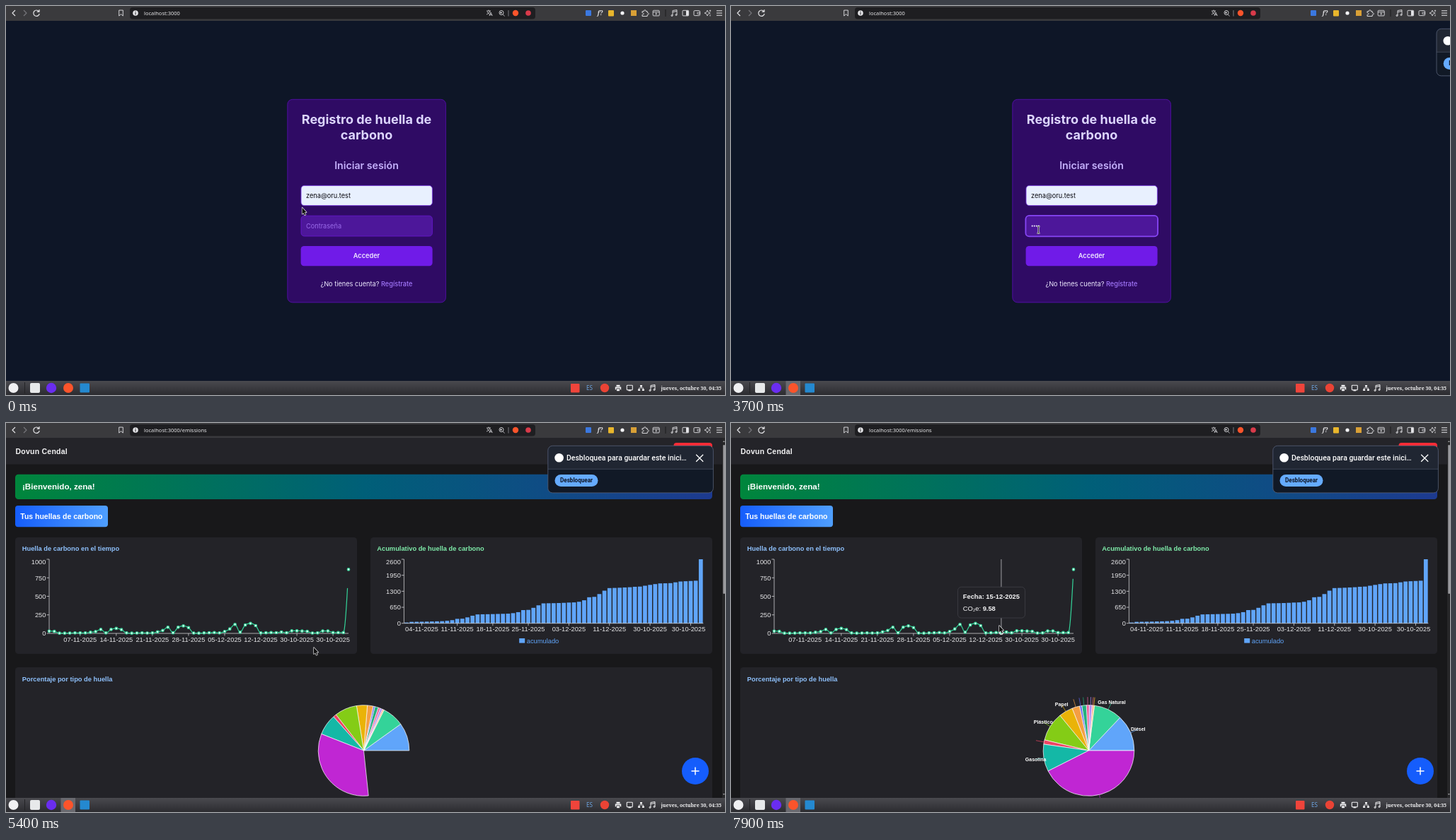
An HTML page with a canvas that plays this animation: 1016 by 551 pixels, repeating every 8 s.

```html
<!DOCTYPE html>
<html lang="es">
<head>
<meta charset="utf-8">
<title>Huella de carbono</title>
<style>
html, body { margin: 0; width: 100%; height: 100%; overflow: hidden; background: #0e1627; }
canvas { display: block; width: 1016px; height: 551px; }
</style>
</head>
<body>
<canvas id="stage"></canvas>
<script>
const W = 1016, H = 551, LOOP = 8000, STEP = 100;
const canvas = document.getElementById('stage');
const dpr = window.devicePixelRatio || 1;
canvas.width = W * dpr;
canvas.height = H * dpr;
const c = canvas.getContext('2d');

const INTER = 'Inter, sans-serif';
const ARIAL = '"Liberation Sans", Arial, sans-serif';
const ROBOTO = 'Roboto, sans-serif';
const NOTO = '"Noto Sans", sans-serif';
const SERIF = '"Noto Serif", serif';

// ---- helpers ----
const clamp = (v, a = 0, b = 1) => Math.min(b, Math.max(a, v));
const lerp = (a, b, k) => a + (b - a) * k;

// CSS "ease": cubic-bezier(.25, .1, .25, 1)
function ease(x) {
  x = clamp(x);
  let lo = 0, hi = 1;
  for (let i = 0; i < 24; i++) {
    const s = (lo + hi) / 2, r = 1 - s;
    if (0.75 * r * r * s + 0.75 * r * s * s + s * s * s < x) lo = s; else hi = s;
  }
  const r = 1 - lo;
  return 0.3 * r * r * lo + 3 * r * lo * lo + lo ** 3;
}

function rect(x, y, w, h, fill) {
  c.fillStyle = fill;
  c.fillRect(x, y, w, h);
}

function box(x, y, w, h, r, fill, stroke, lw = 0.8) {
  c.beginPath();
  c.roundRect(x, y, w, h, r);
  if (fill) { c.fillStyle = fill; c.fill(); }
  if (stroke) { c.strokeStyle = stroke; c.lineWidth = lw; c.stroke(); }
}

function disc(x, y, r, fill, stroke, lw = 1) {
  c.beginPath();
  c.arc(x, y, r, 0, 7);
  if (fill) { c.fillStyle = fill; c.fill(); }
  if (stroke) { c.strokeStyle = stroke; c.lineWidth = lw; c.stroke(); }
}

function line(x1, y1, x2, y2, color, lw = 0.7) {
  c.beginPath();
  c.moveTo(x1, y1);
  c.lineTo(x2, y2);
  c.strokeStyle = color;
  c.lineWidth = lw;
  c.stroke();
}

function icon(d, x, y, color = '#e4e4e7', lw = 1.1, fill = false) {
  const p = new Path2D(d);
  c.save();
  c.translate(x, y);
  if (fill) { c.fillStyle = color; c.fill(p); }
  else { c.strokeStyle = color; c.lineWidth = lw; c.stroke(p); }
  c.restore();
}

// y is the middle of the capitals; returns the advance width
function text(s, x, y, size, font, color, weight = 400, align = 'left') {
  c.font = `${weight} ${size}px ${font}`;
  c.textAlign = align;
  c.fillStyle = color;
  c.fillText(s, x, y + size * 0.36);
  return c.measureText(s).width;
}

function hGrad(x1, x2, ...colors) {
  const g = c.createLinearGradient(x1, 0, x2, 0);
  colors.forEach((col, i) => g.addColorStop(i / (colors.length - 1), col));
  return g;
}

// ---- chart data ----
const DAILY = [31, 27, 3, 3, 4, 6, 6, 6, 15, 25, 53, 6, 53, 67, 51, 6, 3, 5, 6, 5, 6, 21, 40, 83, 8,
  83, 101, 78, 5, 3, 6, 8, 11, 6, 26, 60, 121, 16, 113, 135, 105, 6, 8, 11, 9.58, 18, 8, 34, 34, 32,
  27, 5, 6, 33, 33, 11, 10, 11, 863];
const N = DAILY.length;
const L = { x: 61, y: 298, w: 423, h: 105, top: 193 };
const B = { x: 562.4, y: 283.7, w: 423, h: 90.7, top: 193 };
const DX = L.w / (N - 1), BAND = B.w / N;
const dots = DAILY.map((v, i) => [L.x + DX * i, L.y - v / 1000 * L.h]);
let sum = 0;
const totals = DAILY.map(v => sum += v);

function dateOf(i) {
  if (i > 46) return '30-10-2025';
  const day = i % 30 + 1, month = i < 30 ? 11 : 12;
  return `${String(day).padStart(2, '0')}-${month}-2025`;
}

// Monotone cubic through the dots, sampled to a polyline
const curve = (() => {
  const slope = i => (dots[i + 1][1] - dots[i][1]) / DX;
  const m = dots.map((_, i) => {
    if (!i || i === N - 1) return 0;
    const a = slope(i - 1), b = slope(i);
    return (Math.sign(a) + Math.sign(b)) * Math.min(Math.abs(a), Math.abs(b), Math.abs(a + b) / 4);
  });
  m[0] = (3 * slope(0) - m[1]) / 2;
  m[N - 1] = (3 * slope(N - 2) - m[N - 2]) / 2;
  const pts = [];
  let len = 0;
  for (let i = 0; i < N - 1; i++) {
    for (let j = i ? 1 : 0; j <= 10; j++) {
      const u = j / 10, v = 1 - u;
      const x = dots[i][0] + DX * u;
      const y = dots[i][1] * v * v * (1 + 2 * u) + dots[i + 1][1] * u * u * (3 - 2 * u)
        + DX * u * v * (m[i] * v - m[i + 1] * u);
      const p = pts[pts.length - 1];
      if (p) len += Math.hypot(x - p[0], y - p[1]);
      pts.push([x, y, len]);
    }
  }
  return { pts, len };
})();

// end angle in degrees, colour, label
const SLICES = [
  [46.6, '#60a5fa', 'Diésel'], [82.8, '#34d399', 'Gas Natural'], [84.3, '#fbbf24'], [86, '#fb7185'],
  [89.4, '#a78bfa'], [93, '#ec5f9e'], [98.9, '#22b07d'], [101.7, '#6366f1'], [111.4, '#f59e42'],
  [129.3, '#eab308', 'Papel'], [166.4, '#84cc16', 'Plástico'], [171.9, '#ef4463'],
  [206.8, '#14b8a6', 'Gasolina'], [360, '#c026d3']
];

// ---- browser and desktop bars ----
const NOTE = 'M-2 3V-4L4 -5V2M-2 -2L4 -3M-4 3a1 1 0 1 0 2 0a1 1 0 1 0 -2 0M2 2a1 1 0 1 0 2 0a1 1 0 1 0 -2 0';

function browserBar(url) {
  const ink = '#e4e4e7';
  rect(0, 0, W, 21, '#3a3a3d');
  box(175, 2, 573, 16.5, 4, '#1e1e21');
  icon('M2 -4L-2 0L2 4', 11, 10);
  icon('M-2 -4L2 0L-2 4', 27, 10, '#77777c');
  icon('M3.5 -2.2A4.2 4.2 0 1 0 4.2 .8M4 -5V-1.8H.8', 43, 10, ink, 1.2);
  icon('M-2.8 -4H2.8V4L0 1.5L-2.8 4Z', 162.5, 10, ink, 0.9);
  disc(183, 10, 3.8, ink);
  rect(182.5, 9.3, 1, 3, '#1e1e21');
  rect(182.5, 7.6, 1, 1, '#1e1e21');
  text(url, 195, 10, 7.5, NOTO, '#e8e8ea');
  icon('M-4 -3H2M-1 -4.5V-3M1 -3C0 0 -2 1 -4 2M-3 -2C-2 0 -1 1 0 1.5M0 4L2 -1L4.2 4M.8 2.4H3.4', 683, 10, ink, 0.8);
  disc(700, 9.5, 3, null, ink, 0.9);
  icon('M2.2 2L4.6 4.4M-2 -.5H1M-.5 -2V1', 700, 10, ink, 0.8);
  line(710, 6, 710, 14.5, '#a1a1aa');
  disc(720, 10, 4.2, '#fb542b');
  disc(738, 10, 3.8, '#d93a4a');
  box(819, 6, 8, 8, 1, '#3b78e0');
  text('f?', 839.5, 10, 8, SERIF, ink, 'italic 700', 'center');
  box(851, 6, 8, 8.5, 1, '#e9b62c');
  disc(871, 10, 2.6, '#f4f4f5');
  box(883, 6, 8, 8, 0, '#d9a036');
  icon('M-4 -2.5H-1.5A1.4 1.4 0 1 1 1.2 -2.5H3.2V-.2A1.4 1.4 0 1 1 3.2 2.3V4.5H-4V2.3A1.4 1.4 0 1 0 -4 -.2Z', 903, 10, ink, 0.9);
  box(914.2, 6.3, 9, 7.6, 1, null, ink, 0.9);
  icon('M-4.5 -1.5H4.5M-1 1A1 1 0 1 0 1 1A1 1 0 1 0 -1 1', 918.7, 10, ink, 0.8);
  line(932, 5, 932, 15, '#1c1c1e', 1);
  icon(NOTE, 944, 10.5, ink, 0.9);
  box(956, 6.3, 8.6, 7.6, 1, null, ink, 0.9);
  rect(961, 6.5, 3.4, 7.2, ink);
  box(972, 6.6, 8.6, 7, 1.2, null, ink, 0.9);
  box(977, 9, 3.6, 2.4, 0.5, null, ink, 0.8);
  icon('M-1 -4L.3 -1.2L3.2 0L.3 1.2L-1 4L-2.2 1.2L-5 0L-2.2 -1.2ZM3 -4.5V-2M1.8 -3.2H4.2M3 2V4.5', 992, 10, ink, 0.8);
  icon('M-4 -3.2H4M-4 0H4M-4 3.2H4', 1008, 10);
}

function taskbar(active) {
  const ink = '#f0f0f2', y = 541;
  const g = c.createLinearGradient(0, 531, 0, H);
  g.addColorStop(0, '#4a4a4f');
  g.addColorStop(1, '#2c2c30');
  rect(0, 531, W, 20, g);
  if (active) rect(77.5, 531, 20.5, 20, '#69696f');
  disc(10.5, y, 7, '#f0f0f2');
  line(26.5, 533, 26.5, 549, '#232326', 1);
  box(34, 534, 14, 14, 2, '#e7e9ea');
  disc(64, y, 7.2, '#6a2df0');
  disc(88, y, 7, '#fb542b');
  box(104.5, 534.5, 13.5, 13, 1, '#2489d0');
  box(798, 535, 12.5, 12.5, 1, '#ef443b');
  text('ES', 824.5, y, 8.2, NOTO, '#6ba3df', 400, 'center');
  disc(846, y, 6.2, '#ea4335');
  icon('M-2.5 -4.2H2.5V-2H-2.5ZM-4.2 -1.4H4.2V2.4H2.7V.6H-2.7V2.4H-4.2ZM-2 1.4H2V4.2H-2Z', 865, y, ink, 1, true);
  box(877.3, 537.3, 8, 6.6, 0.8, null, ink, 1.1);
  rect(879.5, 544, 3.6, 1.4, ink);
  icon('M-1.5 -4H1.5V-1.5H-1.5ZM-4.4 1.5H-1.4V4H-4.4ZM1.4 1.5H4.4V4H1.4Z', 897.5, y, ink, 1, true);
  icon('M0 -1.5V0M-2.9 1.5V0H2.9V1.5', 897.5, y, ink, 0.8);
  icon(NOTE, 913, y + 0.5, ink, 1);
  text('jueves, octubre 30, 04:35', 1011, y, 7, SERIF, '#f4f4f5', 700, 'right');
}

// ---- sign-in page ----
function signIn(t) {
  rect(0, 21, W, 510, '#0e1627');
  box(397.8, 132.3, 223.6, 287.6, 7, '#2f0b64', '#5b10b4');
  text('Registro de huella de', 509.5, 161, 18, INTER, '#ddd6ff', 700, 'center');
  text('carbono', 509.5, 182.5, 18, INTER, '#ddd6ff', 700, 'center');
  text('Iniciar sesión', 509.5, 226, 14.2, INTER, '#c4b0fb', 600, 'center');

  const onMail = t === 600, onPass = t >= 700;
  box(417, 254.4, 185.4, 28.2, 4.5, '#e8f0fe', onMail ? '#8e51ff' : '#7a3be6', onMail ? 2 : 0.8);
  text('zena@oru.test', 424, 268.3, 9.2, INTER, '#0b0b10');
  if (onPass) box(416.4, 296.8, 186.7, 29.6, 5, '#4d179a', '#8746f5', 1.8);
  else box(417, 297.2, 185.4, 28.8, 4.5, '#4d179a', '#6a18d4');

  const typed = t < 1900 ? 0 : t < 2200 ? 1 : t < 2500 ? 2 : 4;
  if (!typed) text('Contraseña', 424, 311.3, 9.2, INTER, '#9a6bea');
  for (let i = 0; i < typed; i++) disc(425.7 + 3.05 * i, 311.6, 1.05, '#ede9fe');
  if (typed && t < 3100) rect(424.2 + 2.95 * typed, 305.5, 0.7, 11.5, '#ede9fe');

  box(416.6, 340, 186, 28.2, 4.5, '#701be8');
  text('Acceder', 509.5, 354, 9.2, INTER, '#f0ebff', 600, 'center');
  const w = text('¿No tienes cuenta? ', 444.5, 393.8, 9.2, INTER, '#ede9fe');
  text('Regístrate', 444.5 + w, 393.8, 9.2, INTER, '#a277fb', 500);

  const alpha = t < 1900 ? clamp((t - 800) / 500) : clamp((2000 - t) / 200);
  if (alpha > 0) unlockMenu(alpha);
}

function unlockMenu(alpha) {
  c.save();
  c.globalAlpha = alpha;
  box(581, 303.5, 13, 14, 1, '#2566e0');
  box(587.5, 314, 9, 6.6, 1.2, '#f4f4f5', '#2a2a2e', 0.6);
  icon('M-2 0V-1.5A2 2 0 0 1 2 -1.5V0', 592, 314, '#f4f4f5', 1);
  rect(590, 316.4, 4, 1.6, '#2a2a2e');

  box(416.8, 326.8, 186.6, 55.8, 2.5, '#2f343d', '#4b515c');
  line(417, 361, 603, 361, '#4b515c');
  text('Desbloquea tu cuenta para ver sugerencias de', 421.8, 337.4, 8.15, ROBOTO, '#fff');
  text('autocompletado', 421.8, 349.8, 8.15, ROBOTO, '#fff');
  box(425.5, 371, 7.6, 5.6, 1, null, '#6aa9fb', 1);
  icon('M-2 0V-1.6A2 2 0 0 1 1.8 -2.4', 429.2, 371, '#6aa9fb', 1);
  rect(428, 373.2, 2.6, 1, '#6aa9fb');
  text('Desbloquear la cuenta', 438.5, 372, 9.31, ROBOTO, '#6aa9fb', 700);
  c.restore();
}

// ---- dashboard ----
const INK = '#e6e6e8', CARD = '#232328';

function dashboard(t, mouse) {
  rect(0, 21, W, 510, '#18181a');
  rect(0, 21, 1012, 37.5, '#242429');
  c.letterSpacing = '0.26px';
  text('Dovun Cendal', 13.5, 40, 10.48, ARIAL, '#f4f4f5', 700);
  c.letterSpacing = '0px';
  box(943.5, 28, 54.5, 24, 4, '#fb2c36');

  box(13, 72.8, 985, 35.2, 4.5, hGrad(13, 998, '#00863c', '#005f78', '#1d3a90'));
  text('¡Bienvenido, zena!', 23, 89.8, 11.64, ARIAL, '#fff', 700);
  box(13, 117, 131, 30.3, 4, hGrad(13, 144, '#155dfc', '#4f9fff'));
  text('Tus huellas de carbono', 20.3, 132.2, 10.48, ARIAL, '#fff', 700);

  box(13, 162, 483, 165, 4.5, CARD);
  box(515, 162, 483, 165, 4.5, CARD);
  box(13, 346, 985, 220, 4.5, CARD);
  text('Huella de carbono en el tiempo', 22.8, 177.3, 9.31, ARIAL, '#8ec0fb', 700);
  text('Acumulativo de huella de carbono', 524.3, 177.3, 9.31, ARIAL, '#7fecaa', 700);
  text('Porcentaje por tipo de huella', 22.8, 362.3, 9.31, ARIAL, '#8ec0fb', 700);

  const ready = t >= 4200;
  if (ready) {
    barChart(ease((t - 4200) / 400));
    lineChart(ease((t - 4200) / 1500));
    pie(ease((t - 4738) / 1420), t >= 6200);
    if (t > 6600 && mouse.y < L.y) hover(t, mouse);
  }

  disc(974, 493, 19, '#155dfc');
  icon('M-5.5 0H5.5M0 -5.5V5.5', 974, 493, '#fff', 1.5);
  return ready;
}

function axes(a, marks, xs) {
  line(a.x, a.top, a.x, a.y, INK);
  line(a.x, a.y, a.x + a.w, a.y, INK);
  marks.forEach((m, i) => {
    const y = a.y - i / (marks.length - 1) * (a.y - a.top);
    line(a.x - 3.5, y, a.x, y, INK);
    text(m, a.x - 4.6, Math.max(y, 196.6), 9.31, ARIAL, INK, 400, 'right');
  });
  xs.forEach(([i, x]) => {
    line(x, a.y, x, a.y + 3.5, INK);
    text(dateOf(i), Math.min(x, 964.6), a.y + 8.4, 9.31, ARIAL, INK, 400, 'center');
  });
}

function barChart(k) {
  totals.forEach((v, i) => {
    const h = v / sum * B.h * k;
    rect(B.x + BAND * (i + 0.1), B.y - h, BAND * 0.8, h, '#60a5fa');
  });
  axes(B, [0, 650, 1300, 1950, 2600],
    [3, 10, 17, 24, 32, 40, 48, 56].map(i => [i, B.x + BAND * (i + 0.5)]));
  rect(725.2, 305, 8, 6.6, '#60a5fa');
  text('acumulado', 735.8, 308.2, 9.31, ARIAL, '#60a5fa');
}

function lineChart(k) {
  axes(L, [0, 250, 500, 750, 1000],
    [6, 13, 20, 27, 34, 41, 48, 55].map(i => [i, dots[i][0]]));
  c.beginPath();
  for (const [x, y, len] of curve.pts) {
    if (len > curve.len * k) break;
    c.lineTo(x, y);
  }
  c.strokeStyle = '#34d399';
  c.lineWidth = 1.2;
  c.stroke();
  for (const [x, y] of dots) disc(x, y, 1.75, '#fff', '#34d399', 1.2);
}

function pie(k, labels) {
  if (k <= 0) return;
  const x = 505.5, y = 464, r = 64.3, rad = Math.PI / 180;
  const at = (deg, d) => [x + d * Math.cos(deg * rad), y - d * Math.sin(deg * rad)];
  let from = 0;
  const mids = SLICES.map(([to, color]) => {
    c.beginPath();
    c.moveTo(x, y);
    c.arc(x, y, r, -from * k * rad, -to * k * rad, true);
    c.closePath();
    c.fillStyle = color;
    c.fill();
    c.strokeStyle = '#fff';
    c.lineWidth = 0.7;
    c.stroke();
    const mid = (from + to) / 2;
    from = to;
    return mid;
  });
  if (!labels) return;
  SLICES.forEach(([, color, name], i) => {
    const end = at(mids[i], r + 11.6);
    line(...at(mids[i], r), ...end, color);
    if (name) text(name, ...end, 7, ARIAL, '#fff', 700, 'center');
  });
}

function hover(t, mouse) {
  const i = clamp(Math.round((mouse.x - L.x) / DX), 0, N - 1);
  const [x, y] = dots[i];
  line(x, L.top, x, L.y, '#d4d4d8', 0.7);
  disc(x, y, 2.3, '#34d399', '#fff', 1.1);
  const k = ease((t - 6800) / 400);
  const bx = lerp(43, 320.5, k), by = lerp(198, 232.3, k);
  box(bx, by, 95, 43.8, 5, CARD, '#3f3f47');
  text(`Fecha: ${dateOf(i)}`, bx + 7.3, by + 13.6, 9.31, ARIAL, '#f4f4f5', 700);
  const w = text('CO₂e: ', bx + 7.3, by + 30.2, 9.31, ARIAL, '#f4f4f5');
  text(DAILY[i].toFixed(2), bx + 7.3 + w, by + 30.2, 9.31, ARIAL, '#f4f4f5', 700);
}

function scrollbar(tall) {
  rect(1012, 21, 4, 510, '#262628');
  box(1013.3, 31, 2.7, tall ? 211 : 300, 1.3, '#9a9a9e');
  icon('M-1.6 1L0 -1L1.6 1Z', 1014.4, 26, '#9a9a9e', 1, true);
  icon('M-1.6 -1L0 1L1.6 -1Z', 1014.4, 526, '#9a9a9e', 1, true);
}

function notice(t) {
  const s = t < 4000 ? Math.min(t, 3800) : t - 100;
  const x = Math.max(765.8, 997 - 0.89 * (s - 3700));
  if (x > W) return;
  box(x, 32.3, 233.6, 66.6, 6.5, '#111926');
  box(x, 32.3, 233.6, 33, [6.5, 6.5, 0, 0], '#202632');
  line(x, 65.3, x + 233.6, 65.3, '#4c5566');
  box(x, 32.3, 233.6, 66.6, 6.5, null, '#59637a');
  disc(x + 15.8, 49.3, 6.3, '#fff');
  text('Desbloquea para guardar este inici…', x + 26.2, 49, 10.48, ROBOTO, '#fff', 500);
  icon('M-5 -5L5 5M5 -5L-5 5', x + 214.4, 49.8, '#fff', 1.3);
  box(x + 9.7, 73, 61, 17, 8.5, '#65abff');
  text('Desbloquear', x + 40.2, 81.3, 8.15, ROBOTO, '#0f1725', 600, 'center');
}

// ---- pointer ----
function mouseAt(t) {
  const move = (x1, y1, x2, y2, k) => ({ x: lerp(x1, x2, clamp(k)), y: lerp(y1, y2, clamp(k)) });
  if (t < 3800) return move(418.5, 285.5, 434.5, 317, t / 400);
  if (t < 7700) return move(435, 318, 422, 226, (t - 6500) / 900);
  return move(422, 226, 379, 287, (t - 7600) / 300);
}

function pointer({ x, y }, beam) {
  if (beam) {
    const d = 'M-2 -4.8H-.6L0 -4.2L.6 -4.8H2M0 -4.2V4.2M-2 4.8H-.6L0 4.2L.6 4.8H2';
    icon(d, x, y, '#f4f4f5', 2);
    icon(d, x, y, '#111', 0.8);
    return;
  }
  const d = 'M0 0V9.2L2 7.4L3.5 10.8L5 10.2L3.5 6.8H6.2Z';
  icon(d, x, y, '#e8e8ea', 1.3);
  icon(d, x, y, '#111', 1, true);
}

function draw(t) {
  const mouse = mouseAt(t), inside = t >= 3800;
  c.setTransform(dpr, 0, 0, dpr, 0, 0);
  c.lineJoin = 'round';
  if (inside) {
    const tall = dashboard(t, mouse);
    notice(t);
    scrollbar(tall);
  } else {
    signIn(t);
    notice(t);
  }
  browserBar(inside ? 'localhost:3000/emissions' : 'localhost:3000');
  taskbar(t >= 600);
  pointer(mouse, !inside && mouse.y > 297);
}

const start = performance.now();
function tick(now) {
  const t = Math.max(0, now - start) % LOOP;
  draw(Math.floor(t / STEP) * STEP);
  requestAnimationFrame(tick);
}
draw(0);
requestAnimationFrame(tick);
</script>
</body>
</html>
```
